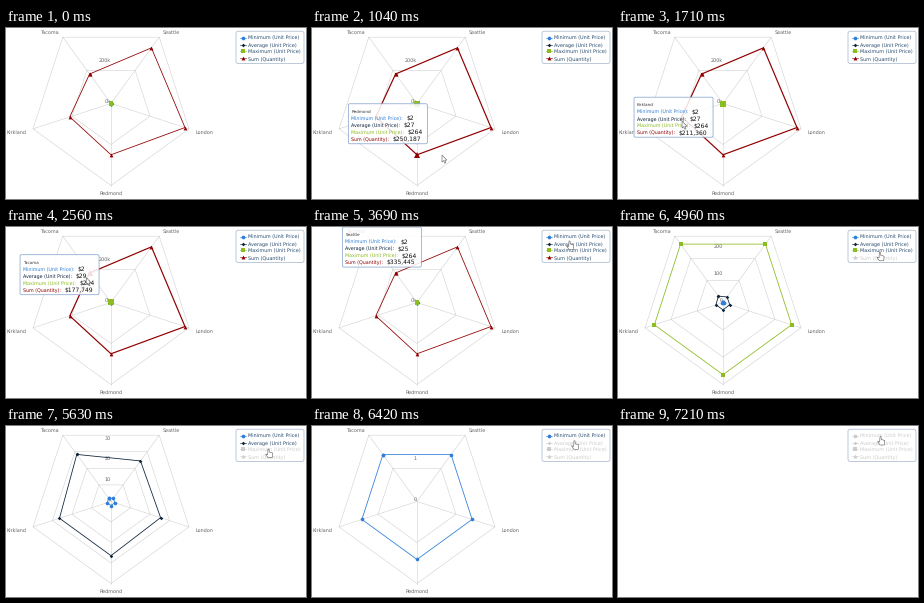
These frames come from a looping animation (300 by 171 pixels, 8 s). A matplotlib script:

```python
import numpy as np
import matplotlib
import matplotlib.pyplot as plt
from matplotlib.animation import FuncAnimation
from matplotlib.patches import FancyBboxPatch, Polygon

W, H, DPI = 300, 171, 100
LOOP, STEP = 8000, 40
PT = 72 / DPI  # points per pixel

matplotlib.rcParams.update({"font.family": "DejaVu Sans", "text.hinting": "none"})

CENTER, RADIUS = np.array([105, 75.5]), 82
CITIES = ["Tacoma", "Seattle", "London", "Redmond", "Kirkland"]
ANGLES = np.radians(216 - 72 * np.arange(5))  # measured from straight down
DIRS = np.column_stack([np.sin(ANGLES), np.cos(ANGLES)])

# name, colour, marker, marker scale, value per city
SERIES = [
    ("Minimum (Unit Price)", "#2f7ed8", "o", 0.95, [2] * 5),
    ("Average (Unit Price)", "#0d233a", "D", 0.66, [29, 25, 26, 27, 27]),
    ("Maximum (Unit Price)", "#8bbc21", "s", 1.0, [264] * 5),
    ("Sum (Quantity)", "#910000", "^", 1.0,
     [177749, 335445, 379480, 250187, 211360]),
]
OFF, INK = "#cccccc", "#274b6d"

# start time, axis maximum, tick step
SCALES = [(0, 400000, 200000), (4450, 300, 100), (5330, 40, 10), (6240, 2, 1)]
CLEAR = 7210
RISE, LEAD = 400, 80

TIP_W, TIP_H, TIP_GAP = 79, 40, 5.4
TIP_FADE, TIP_END = 4100, 4190
FOLLOW = 0.15  # share of the way the tooltip glides per step

# time, x, y of the pointer tip
PATH = np.array([
    (120, 288, 50), (500, 200, 90), (880, 177, 104), (1050, 130, 127),
    (1710, 62, 92), (2560, 79, 51), (3460, 190, 14), (3690, 257, 14),
    (3900, 261, 26.5), (4600, 261, 26.5), (5630, 262, 23), (6820, 262, 10.5),
])
ARROW = np.array([(0, 0), (0, 7), (1.6, 5.6), (2.8, 8.2), (3.9, 7.7),
                  (2.8, 5.2), (4.9, 5.1)])
HAND = np.array([(0, 0), (1, 0), (1.3, 3), (4.8, 4), (4.3, 8.5), (0, 8.5),
                 (-2.5, 5), (-0.3, 5.5)])

fig = plt.figure(figsize=(W / DPI, H / DPI), dpi=DPI, facecolor="white")
ax = fig.add_axes([0, 0, 1, 1])
ax.set_xlim(0, W)
ax.set_ylim(H, 0)
ax.axis("off")


def label(x, y, text="", size=4.9, color="#666666", ha="left", z=3):
    return ax.text(x, y, text, fontsize=size * PT, color=color, ha=ha,
                   va="center_baseline", zorder=z)


def stroke(pts, color, width, z, **kw):
    pts = np.asarray(pts)
    return ax.plot(pts[:, 0], pts[:, 1], color=color, lw=width * PT, zorder=z,
                   mew=0, **kw)[0]


def ring(ratios):
    pts = CENTER + RADIUS * np.reshape(ratios, (-1, 1)) * DIRS
    return np.vstack([pts, pts[:1]])


def text_width(text):
    return text.get_window_extent(fig.canvas.get_renderer()).width


def rounded(x, y, w, h, r, **kw):
    box = FancyBboxPatch((x, y), w, h, boxstyle=f"round,pad=0,rounding_size={r}",
                         **kw)
    return ax.add_patch(box)


def city_label(name, direction):
    x, y = CENTER + (RADIUS + 6.6) * direction
    side = int(np.sign(np.round(direction[0], 3)))
    return label(x, y + 0.7, name, ha=("center", "left", "right")[side])


# Chart frame
spokes = [stroke([CENTER, CENTER + RADIUS * d], "#cccccc", 0.5, 1) for d in DIRS]
rings = [stroke(ring(np.ones(5)), "#cccccc", 0.5, 1) for _ in range(4)]
ticks = [label(104.5, 0, ha="right") for _ in range(4)]
cities = [city_label(*pair) for pair in zip(CITIES, DIRS)]

lines, spots = [], []
for k, (_, color, mark, scale, _) in enumerate(SERIES):
    size = 3.8 * scale * PT
    lines.append(stroke(ring(np.zeros(5)), color, 0.8, 4 + k, marker=mark,
                        ms=size))
    spots.append(stroke([CENTER], color, 1, 4.5 + k, marker=mark, ms=size * 1.4))

# Legend
rounded(230, 3.2, 68, 32.3, 2.2, fc="white", ec="#a3b5cb", lw=0.7 * PT, zorder=2)
keys, names = [], []
for k, (name, color, mark, scale, _) in enumerate(SERIES):
    y = 9.6 + 6.9 * k
    keys.append(stroke([(233.8, y), (237, y), (240.2, y)], color, 0.6, 3,
                       marker=mark, ms=3.9 * scale * PT, markevery=[1]))
    names.append(label(242, y + 0.3, name, color=INK))

# Tooltip
tip_box = rounded(0, 0, TIP_W, TIP_H, 1.5, fc=(1, 1, 1, 0.87), ec="#7f9fca",
                  lw=0.7 * PT, zorder=10)
tip_head = label(0, 0, size=4.1, color="#333333", z=11)
tip_rows = []
for name, color, *_ in SERIES:
    left = label(0, 0, name + ":", 4.8, color, z=11)
    right = label(0, 0, size=6, color="#111111", z=11)
    tip_rows.append((left, right, text_width(left) + 3.2))
tip_parts = [tip_box, tip_head] + [p for row in tip_rows for p in row[:2]]

cursor = ax.add_patch(Polygon(ARROW, closed=True, fc="white", ec="#666666",
                              lw=0.6 * PT, zorder=20))


def clock(i):
    return i * STEP + 10


def pointer(t):
    return np.array([np.interp(t, PATH[:, 0], PATH[:, c]) for c in (1, 2)])


def on_chart(t):
    return pointer(t)[0] < 190


def nearest_city(pos):
    return int(np.argmax(DIRS @ (pos - CENTER)))


def tip_target(pos, city):
    """Left of the mean point of the hovered city, level with the pointer."""
    ratios = np.array([s[4][city] for s in SERIES]) / SCALES[0][1]
    x = CENTER[0] + RADIUS * ratios.mean() * DIRS[city, 0]
    return np.array([x - TIP_W - TIP_GAP, max(pos[1] - 33.7, -0.5)])


def tip_track():
    """City and tooltip corner for every step; None before the first hover."""
    track, city, corner, target = [], None, None, None
    for i in range(LOOP // STEP):
        t = clock(i)
        if on_chart(t):
            city = nearest_city(pointer(t))
            target = tip_target(pointer(t), city)
            corner = target if corner is None else corner
        if corner is not None:
            corner = corner + (target - corner) * FOLLOW
        track.append((city, corner))
    return track


TRACK = tip_track()


def tick_text(value, top):
    return f"{value // 1000}k" if top > 1000 else str(value)


def draw_grid(top, step, shown):
    for part in spokes + cities:
        part.set_visible(shown)
    count = top // step
    for i in range(4):
        on = shown and i < count
        rings[i].set_visible(on)
        ticks[i].set_visible(on)
        if on:
            pts = ring(np.full(5, (i + 1) / count))
            rings[i].set_data(pts[:, 0], pts[:, 1])
            ticks[i].set_y(73.3 - RADIUS * i / count)
            ticks[i].set_text(tick_text(i * step, top))


def draw_series(t, phase, hidden, city):
    start, top, _ = SCALES[phase]
    before = SCALES[max(phase - 1, 0)][1]
    p = min((t - start + LEAD) / RISE, 1)
    ease = 0.5 - 0.5 * np.cos(np.pi * p)
    hover = on_chart(t)
    for k, (_, color, _, _, values) in enumerate(SERIES):
        on = k < len(SERIES) - hidden
        v = np.array(values)
        pts = ring(v / before + (v / top - v / before) * ease)
        lines[k].set_data(pts[:, 0], pts[:, 1])
        lines[k].set_visible(on)
        lines[k].set_linewidth((1.2 if hover and k == 3 else 0.8) * PT)
        spots[k].set_visible(on and hover)
        if hover:
            spots[k].set_data(pts[city:city + 1, 0], pts[city:city + 1, 1])
        keys[k].set_color(color if on else OFF)
        names[k].set_color(INK if on else OFF)


def draw_tip(t, city, corner):
    shown = city is not None and t < TIP_END
    for part in tip_parts:
        part.set_visible(shown)
        part.set_alpha(0.45 if t >= TIP_FADE else None)
    if not shown:
        return
    x, y = corner
    tip_box.set_x(x)
    tip_box.set_y(y)
    tip_head.set_position((x + 3, y + 7.4))
    tip_head.set_text(CITIES[city])
    for k, (left, right, gap) in enumerate(tip_rows):
        row_y = y + 14.5 + 6.9 * k
        left.set_position((x + 3, row_y))
        right.set_position((x + 3 + gap, row_y))
        right.set_text(f"${SERIES[k][4][city]:,}")


def draw_cursor(t):
    cursor.set_visible(t >= PATH[0, 0])
    x, y = pointer(t)
    over_legend = x > 230 and y < 36
    cursor.set_xy((HAND if over_legend else ARROW) + (x, y))


def update(i):
    t = clock(i)
    phase = sum(t >= s[0] for s in SCALES) - 1
    cleared = t >= CLEAR
    city, corner = TRACK[i]
    draw_grid(*SCALES[phase][1:], not cleared)
    draw_series(t, phase, len(SERIES) if cleared else phase, city)
    draw_tip(t, city, corner)
    draw_cursor(t)
    return []


anim = FuncAnimation(fig, update, frames=LOOP // STEP, interval=STEP,
                     init_func=lambda: [], repeat=True, repeat_delay=0, blit=False)
plt.show()
```
